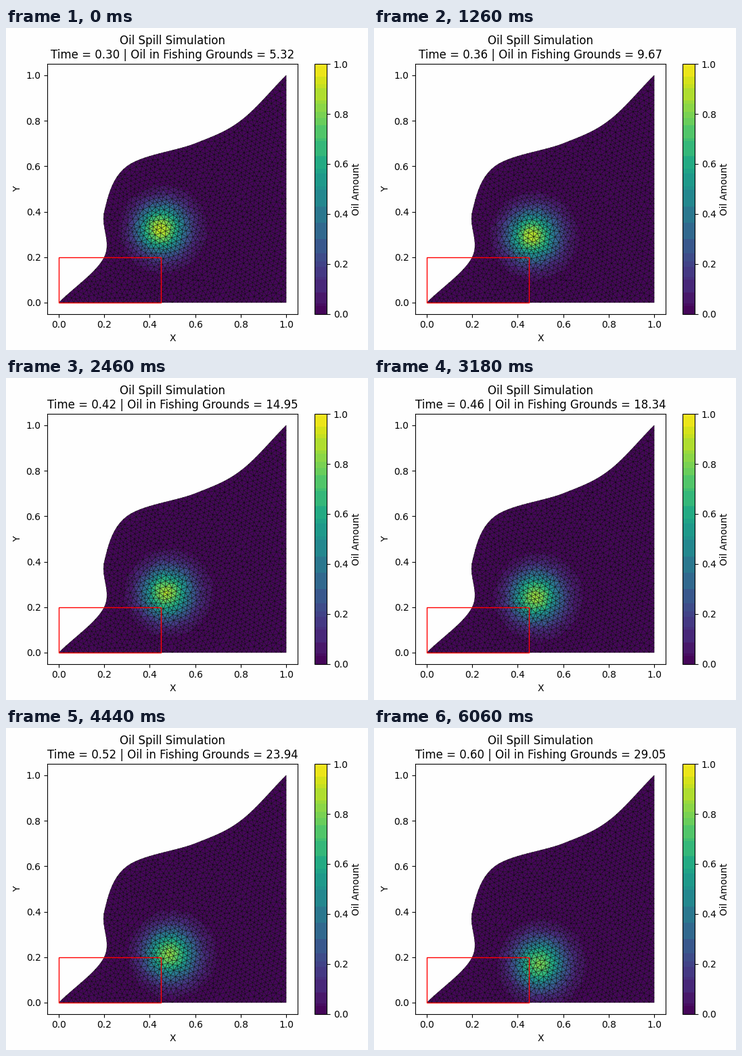
Recreate the animation shown at these times as a matplotlib script. Size 535 by 476 pixels, loop 6120 ms.

```python
import numpy as np
import matplotlib.pyplot as plt
from matplotlib.animation import FuncAnimation
from matplotlib.cm import ScalarMappable
from matplotlib.colors import ListedColormap, Normalize
from matplotlib.patches import Rectangle
from matplotlib.path import Path
from matplotlib.tri import Triangulation

W, H, DPI = 535, 476, 100
FRAMES, INTERVAL = 102, 60
PAPER = "#fefefe"
CELL = 0.0218
LEFT, BOTTOM, SIZE = 61.278, 53.278, 369.6
COAST = np.array([(0, 0), (.2, .2), (.2, .4), (.3, .6), (.6, .7), (.8, .8), (1, 1)])


def catmull_rom(pts, n=200):
    """Smooth curve through pts with mirrored end points."""
    p = np.vstack([2 * pts[0] - pts[1], pts, 2 * pts[-1] - pts[-2]])
    t = np.linspace(0, 1, n, endpoint=False)[:, None]
    parts = []
    for a, b, c, d in zip(p, p[1:], p[2:], p[3:]):
        parts.append(.5 * (2 * b + (c - a) * t + (2 * a - 5 * b + 4 * c - d) * t**2
                           + (3 * b - a - 3 * c + d) * t**3))
    return np.vstack(parts + [pts[-1:]])


def resample(line, step):
    """Points at equal arc length, without the last one."""
    s = np.r_[0, np.cumsum(np.hypot(*np.diff(line, axis=0).T))]
    q = np.linspace(0, s[-1], round(s[-1] / step) + 1)[:-1]
    return np.column_stack([np.interp(q, s, line[:, k]) for k in (0, 1)])


def lattice(angle):
    """Rows of equilateral triangles, turned by angle and slightly shaken."""
    rng = np.random.default_rng(4)
    x, y = np.meshgrid(np.arange(-1, 2, CELL), np.arange(-1, 2, CELL * np.sqrt(3) / 2))
    x[1::2] += CELL / 2
    c, s = np.cos(angle), np.sin(angle)
    pts = np.column_stack([(c * x - s * y).ravel(), (s * x + c * y).ravel()])
    return pts + rng.uniform(-.38, .38, pts.shape) * CELL


def triangulate(pts, outline):
    tris = Triangulation(*pts.T).triangles
    a, b, c = (pts[tris[:, k]] for k in range(3))
    u, v = b - a, c - a
    area = np.abs(u[:, 0] * v[:, 1] - u[:, 1] * v[:, 0]) / 2
    keep = outline.contains_points((a + b + c) / 3) & (area > CELL**2 / 40)
    return tris[keep]


def build_mesh():
    sides = [catmull_rom(COAST), np.array([(1, 1), (1, 0)]), np.array([(1, 0), (0, 0)])]
    rim = np.vstack([resample(s, CELL) for s in sides])
    outline = Path(rim)

    inner = lattice(np.radians(20))
    inner = inner[outline.contains_points(inner)]
    gap = np.linalg.norm(inner[:, None] - rim[None], axis=2).min(axis=1)
    inner = inner[gap > .65 * CELL]

    pts = np.vstack([rim, inner])
    n = len(rim)
    for _ in range(5):
        tris = triangulate(pts, outline)
        total, count = np.zeros_like(pts), np.zeros(len(pts))
        for i, j in ((0, 1), (1, 2), (2, 0)):
            for p, q in ((i, j), (j, i)):
                np.add.at(total, tris[:, p], pts[tris[:, q]])
                np.add.at(count, tris[:, p], 1)
        mean = total / np.maximum(count, 1)[:, None]
        pts[n:] += .7 * (mean[n:] - pts[n:])
    return Triangulation(*pts.T, triangles=triangulate(pts, outline))


def banded_viridis():
    """Viridis with similar colours merged into flat bands."""
    rgb = np.floor(plt.get_cmap("viridis")(np.arange(256))[:, :3] * 255.999)
    keys = rgb // [32, 16, 32]
    _, group = np.unique(keys, axis=0, return_inverse=True)
    group = group.ravel()
    out = np.array([rgb[group == g].mean(axis=0) for g in group])
    return ListedColormap(out / 255)


def clock(i):
    return .297 + .003 * i


def spill_centre(t):
    """Path in the flow v = (y - 0.2 x, -x), by Taylor series."""
    flow = np.array([(-.2, 1), (-1, 0)])
    pos = term = np.array([.35, .45])
    for k in range(1, 9):
        term = flow @ term * (1.06 * t / k)
        pos = pos + term
    return pos


def oil(i):
    t = i / (FRAMES - 1)
    cx, cy = spill_centre(clock(i))
    dx, dy = cells[:, 0] - cx + .003 * t, cells[:, 1] - cy
    spread = (.0112 + .0006 * t) * (1 + .65 * np.clip(dx, -.5, .5))
    return (.91 - .12 * t) * np.exp(-(dx**2 + dy**2) / spread)


# Oil inside the fishing grounds: smooth curve through a few readings
AT = np.array([0, 12, 29, 53, 74, 90, 101]) / 101
CAUGHT = np.polyfit(AT, [5.32, 7.63, 11.68, 18.34, 23.94, 27.35, 29.05], 6)


def headline(i):
    caught = np.polyval(CAUGHT, i / (FRAMES - 1))
    return ("Oil Spill Simulation\n"
            f"Time = {clock(i):.2f} | Oil in Fishing Grounds = {caught:.2f}")


def box(left, width):
    return [left / W, BOTTOM / H, width / W, SIZE / H]


mesh = build_mesh()
cells = np.column_stack([mesh.x, mesh.y])[mesh.triangles].mean(axis=1)
cmap, norm = banded_viridis(), Normalize(0, 1)

fig = plt.figure(figsize=(W / DPI, H / DPI), dpi=DPI, facecolor=PAPER)
ax = fig.add_axes(box(LEFT, SIZE), facecolor=PAPER)
water = ax.tripcolor(mesh, facecolors=oil(0), cmap=cmap, norm=norm,
                     edgecolors="k", linewidth=.3)
ax.add_patch(Rectangle((0, 0), .45, .2, fill=False, edgecolor="red", linewidth=1, zorder=3))
ax.set(xlim=(-.05, 1.05), ylim=(-.05, 1.05), xlabel="X", ylabel="Y")
title = ax.set_title(headline(0))

cax = fig.add_axes(box(LEFT + SIZE + 24.8, SIZE / 20))
fig.colorbar(ScalarMappable(norm, cmap), cax=cax, label="Oil Amount")


def update(i):
    water.set_array(oil(i))
    title.set_text(headline(i))
    return water, title


anim = FuncAnimation(fig, update, frames=FRAMES, interval=INTERVAL, repeat=True, blit=False)
plt.show()
```
